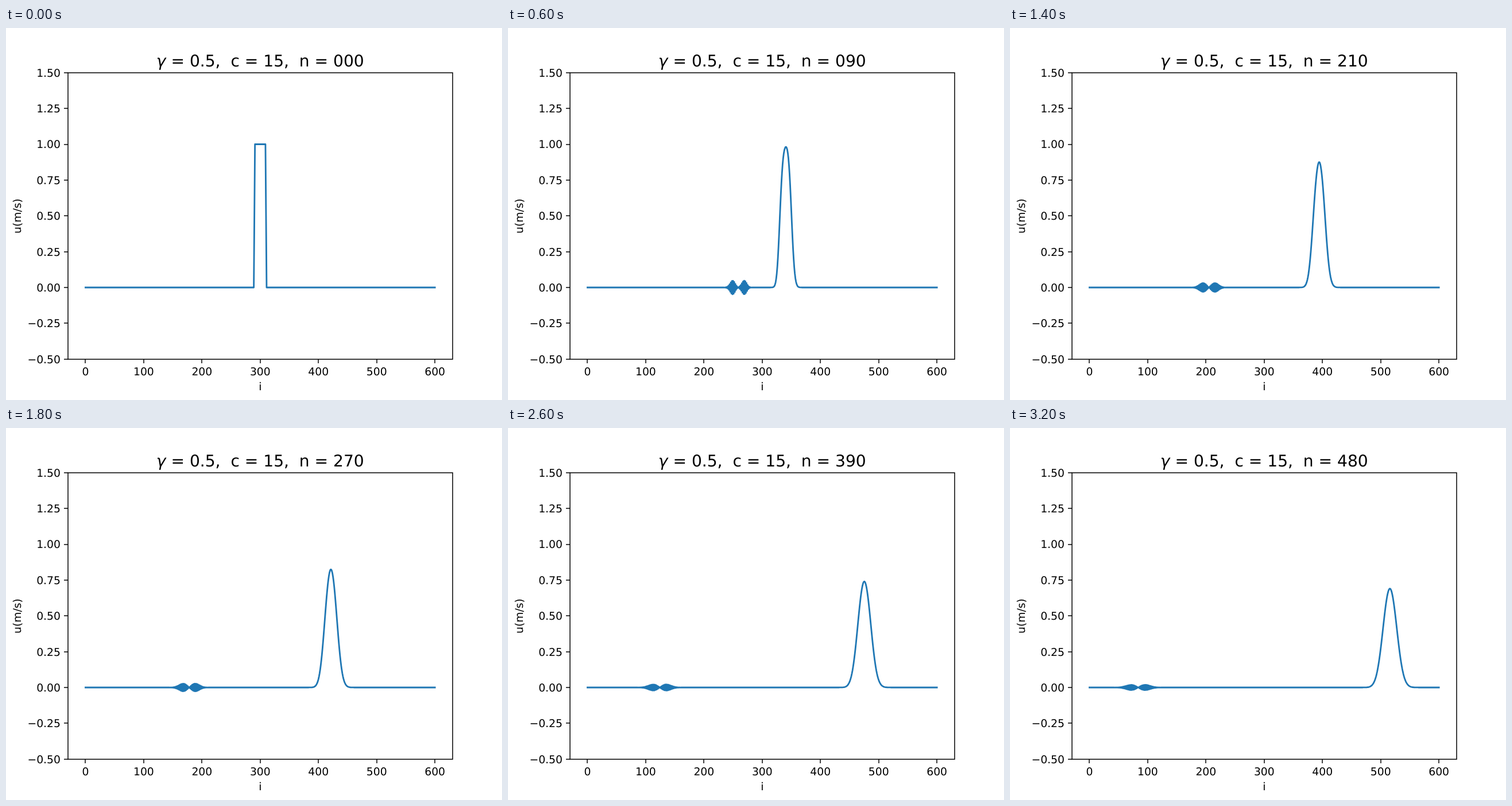
Recreate the animation shown at these times as an HTML page. Size 864 by 648 pixels, loop 3.4 s.

```html
<!DOCTYPE html>
<html lang="en">
<head>
<meta charset="utf-8">
<title>Advected pulse</title>
<style>
  html, body { margin: 0; width: 100%; height: 100%; overflow: hidden; background: #fff; }
  svg { display: block; width: 864px; height: 648px; }
  text {
    font: 18.75px "DejaVu Sans", sans-serif;
    text-rendering: geometricPrecision;
    white-space: pre;
  }
  .title { font-size: 28.125px; }
  .slant { font-style: italic; }
  .axis { fill: none; stroke: #000; stroke-width: 1.5; }
  .curve {
    fill: none; stroke: #1f77b4; stroke-width: 2.8125;
    stroke-linejoin: round; stroke-linecap: square;
  }
</style>
</head>
<body>
<svg viewBox="0 0 864 648">
  <path class="curve" id="curve"/>
  <g id="axes"></g>
  <rect class="axis" x="108" y="78" width="670" height="499"/>
  <text x="442.8" y="631" text-anchor="middle">i</text>
  <text transform="translate(26 327.5) rotate(-90)" text-anchor="middle">u(m/s)</text>
  <text class="title" x="442.8" y="67" text-anchor="middle"><tspan class="slant">γ</tspan> = 0.5,&#160; c = 15,&#160; n = <tspan id="count">000</tspan></text>
</svg>
<script>
const SIZE = 601, GAMMA = 0.5, COURANT = 0.45;
const STEPS = 30, FRAMES = 17, HOLD = 200;

const px = i => 138.44 + i * 669.6 / 660;
const py = u => 451.98 - u * 249.48;

const curve = document.getElementById('curve');
const count = document.getElementById('count');
const axes = document.getElementById('axes');

function add(tag, attrs, text = '') {
  const el = document.createElementNS('http://www.w3.org/2000/svg', tag);
  for (const key in attrs) el.setAttribute(key, attrs[key]);
  el.textContent = text;
  axes.append(el);
}

for (let i = 0; i <= 600; i += 100) {
  add('path', { class: 'axis', d: `M${Math.round(px(i))} 577v7` });
  add('text', { x: px(i), y: 605, 'text-anchor': 'middle' }, i);
}
for (let u = -0.5; u <= 1.5; u += 0.25) {
  const y = py(u);
  add('path', { class: 'axis', d: `M108 ${Math.round(y)}h-7` });
  add('text', { x: 94.9, y: y + 6.9, 'text-anchor': 'end' }, u.toFixed(2).replace('-', '\u2212'));
}

// Leapfrog advection with a time filter of strength GAMMA
let past = Array.from({ length: SIZE }, (_, i) => i >= 290 && i < 310 ? 1 : 0);
let now = past.map((v, i) => i === 290 || i === 310 ? 0.5 : v);

function advance() {
  const next = past.map((v, i) =>
    v - COURANT * (now[(i + 1) % SIZE] - now[(i + SIZE - 1) % SIZE]));
  past = now.map((v, i) => v + GAMMA * (past[i] - 2 * v + next[i]));
  now = next;
}

const trace = u => 'M' + u.map((v, i) => px(i).toFixed(2) + ' ' + py(v).toFixed(2)).join('L');

const shapes = [];
for (let k = 0; k < FRAMES; k++) {
  shapes.push(trace(now));
  for (let s = 0; s < STEPS; s++) advance();
}

const start = performance.now();
let shown = -1;
function draw() {
  const k = Math.floor((performance.now() - start) / HOLD) % FRAMES;
  if (k !== shown) {
    shown = k;
    curve.setAttribute('d', shapes[k]);
    count.textContent = String(k * STEPS).padStart(3, '0');
  }
  requestAnimationFrame(draw);
}
draw();
</script>
</body>
</html>
```
